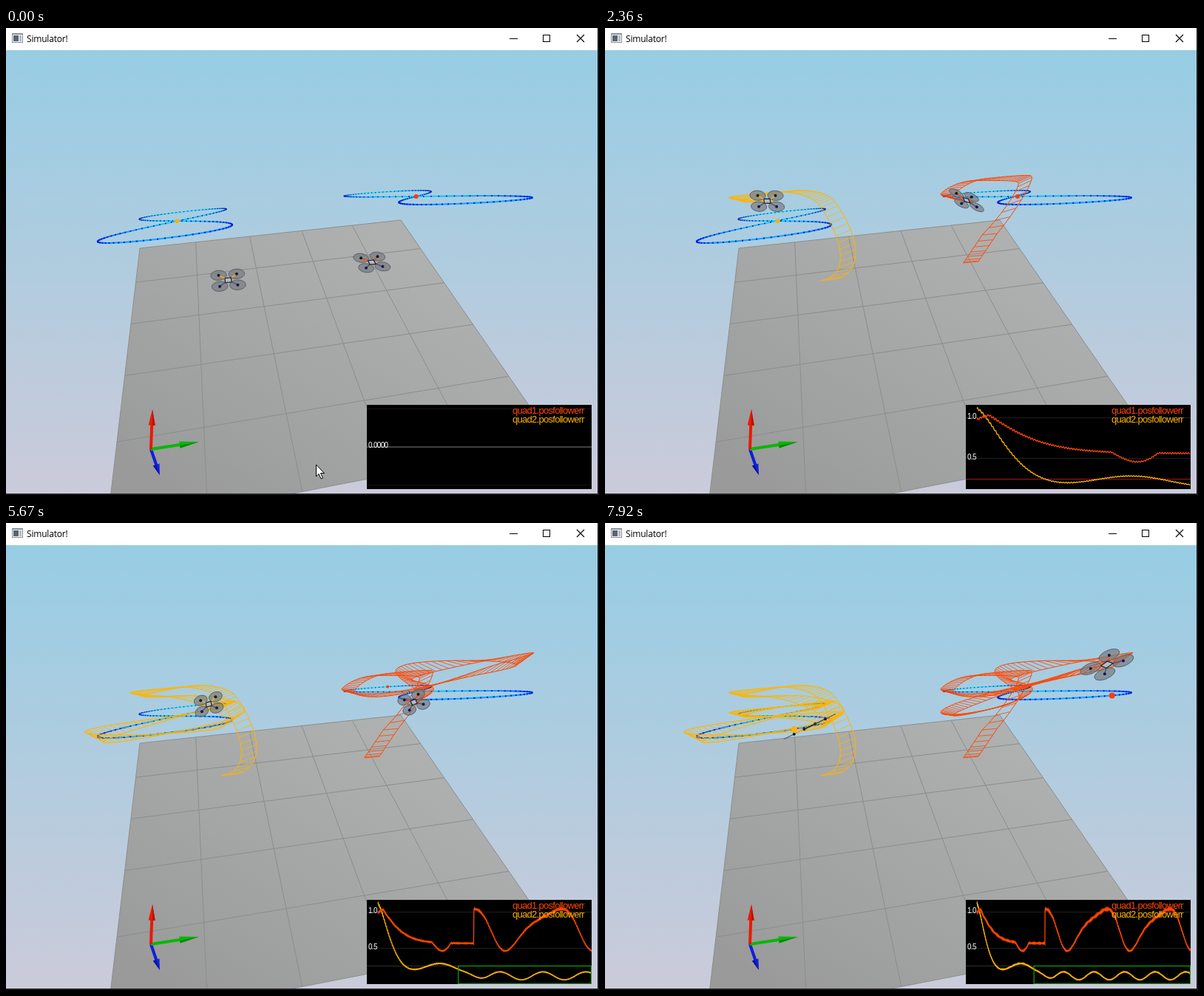
Write an HTML page with a canvas that moves like this. It is 802 by 632 pixels and loops after 8000 ms.

```html
<!DOCTYPE html>
<html lang="en">
<head>
<meta charset="utf-8">
<title>Simulator!</title>
<style>
  html, body { margin: 0; width: 100%; height: 100%; overflow: hidden; background: #fff; }
  canvas { display: block; }
</style>
</head>
<body>
<canvas id="stage" width="802" height="632"></canvas>
<script>
const LOOP = 8000, START = 150, LAP = 4590, TAU = 2 * Math.PI;
const RED = '#ff4600', YELLOW = '#ffb400';
const ctx = document.getElementById('stage').getContext('2d');

// The picture advances in even steps between these times (ms).
const ticks = [970, 1120, 1980, 2830, 3660, 4500, 5350, 6220, 7070, 7920];

// Smooth 0..1 ramp between two times.
function ease(from, to, t) {
  const f = Math.min(Math.max((t - from) / (to - from), 0), 1);
  return f * f * (3 - 2 * f);
}

// Perspective map of the unit square onto four corners.
function perspective([[x0, y0], [x1, y1], [x2, y2], [x3, y3]]) {
  const ax = x1 - x2, bx = x3 - x2, cx = x0 - x1 + x2 - x3;
  const ay = y1 - y2, by = y3 - y2, cy = y0 - y1 + y2 - y3;
  const det = ax * by - bx * ay, g = (cx * by - bx * cy) / det, h = (ax * cy - cx * ay) / det;
  return (s, t) => {
    const w = g * s + h * t + 1;
    return [((x1 - x0 + g * x1) * s + (x3 - x0 + h * x3) * t + x0) / w,
            ((y1 - y0 + g * y1) * s + (y3 - y0 + h * y3) * t + y0) / w];
  };
}

const lapAngle = t => Math.max(t - 60, 0) / LAP * TAU;
const sway = t => Math.cos((t - 3950) / LAP * TAU);

// Corners run near left, near right, far right, far left.
// Each drone chases its target with a lag, a take-off offset and a height error.
const drones = [
  {
    color: YELLOW, spot: '#ffb008', size: 12.2, back: [.8, 7.5], reach: 1.05, home: [69, 80],
    map: perspective([[126, 287], [306, 266], [298, 245], [181, 258]]),
    lag: () => 80,
    lift: t => 27 * (ease(500, 1300, t) - ease(2400, 3250, t)),
    error(s) {
      const climb = 1.01 * Math.exp(-((s / 420) ** 1.45));
      const bump = .18 * Math.exp(-(((s - 1600) / 620) ** 2));
      const ripple = .055 * Math.cos((s - 3150) / 1110 * TAU);
      return .11 + climb + bump + ease(2000, 3000, s) * (.01 + ripple);
    }
  },
  {
    color: RED, spot: '#ff3c10', size: 11.2, back: [3.5, 6.8], reach: .89, home: [-60, 89],
    map: perspective([[537, 238], [702, 228], [569, 220], [459, 228]]),
    lag: t => 400 + 130 * sway(t),
    lift: t => 17 * (ease(450, 900, t) - ease(1400, 2000, t)) + ease(1900, 3200, t) * (8 + 43 * sway(t)),
    error(s) {
      const peak = 2475, a = (s < peak ? peak - s : s - peak) / 2268 * TAU;
      const wave = .755 + .29 * Math.cos(a + .55 * (1 - Math.cos(a)));
      const climb = .57 + .55 * Math.exp(-((s / 520) ** 1.3));
      return s < peak ? Math.min(wave, climb) : wave;
    }
  }
];

for (const d of drones) {
  // Figure-eight: u runs away from the viewer, v to the right.
  d.target = (a, reach = 1) =>
    d.map((reach * Math.sin(2 * a) + 1) / 2, (Math.SQRT2 * Math.sin(a) + 1) / 2);

  d.state = t => {
    const a = lapAngle(t - d.lag(t)), u = Math.sin(a), v = Math.sin(2 * a), near = Math.max(-u, 0);
    const grounded = 1 - ease(START, 850, t), [tx, ty] = d.target(a, d.reach);
    const x = tx + d.home[0] * grounded, y = ty + d.home[1] * grounded - d.lift(t);
    const ax = d.size - 2.2 * u, ay = -1 - (6 - 3.5 * u) * v;
    const bx = d.back[0] + 10 * near * v, by = d.back[1] - 13 * near ** 3;
    return { t, x, y, ax, ay, bx, by,
      left: [x - .9 * ax, y - .9 * ay], right: [x + .9 * ax, y + .9 * ay] };
  };

  d.rungs = [];
  for (let t = START; t < LOOP; t += 45) d.rungs.push(d.state(t));
  d.plot = [];
  for (let s = 0; s <= LOOP - START; s += 7) {
    const e = d.error(s);
    d.plot.push([s, e + (.003 + .009 * e) * Math.sin(s / 27 * TAU)]);
  }
}

function line(c, points, color, width = 1) {
  c.beginPath();
  points.forEach(([x, y]) => c.lineTo(x, y));
  c.strokeStyle = color;
  c.lineWidth = width;
  c.stroke();
}

function fillShape(c, points, color) {
  c.beginPath();
  points.forEach(([x, y]) => c.lineTo(x, y));
  c.closePath();
  c.fillStyle = color;
  c.fill();
}

function fillRect(c, x, y, w, h, color) {
  c.fillStyle = color;
  c.fillRect(x, y, w, h);
}

function dot(c, [x, y], r, color) {
  c.beginPath();
  c.arc(x, y, r, 0, TAU);
  c.fillStyle = color;
  c.fill();
}

function text(c, str, x, y, font, color, spacing = 0) {
  c.font = font;
  c.letterSpacing = spacing + 'px';
  c.fillStyle = color;
  c.fillText(str, x, y);
}

function arrow(c, x, y, color, shade) {
  const ox = 196, oy = 570, dx = x - ox, dy = y - oy, len = Math.hypot(dx, dy);
  const at = (f, w) => [ox + dx * f - dy / len * w, oy + dy * f + dx / len * w];
  fillShape(c, [at(0, -2), at(.65, -2), at(.65, 2), at(0, 2)], color);
  fillShape(c, [at(.6, -4.5), at(1, 0), at(.6, 4.5)], color);
  fillShape(c, [at(.6, 1), at(1, 0), at(.6, 4.5)], shade);
}

function drawFloor(c) {
  const at = perspective([[136, 679], [742, 561], [534, 260], [181, 298]]);
  const shade = c.createLinearGradient(480, 260, 250, 640);
  shade.addColorStop(0, '#afb0b0');
  shade.addColorStop(.6, '#a2a4a4');
  shade.addColorStop(1, '#9a9a9a');
  fillShape(c, [at(0, 0), at(1, 0), at(1, 1), at(0, 1)], shade);
  for (let i = 0; i <= 5; i++) {
    line(c, [at(i / 5, 0), at(i / 5, 1)], '#8b8e8e');
    line(c, [at(0, i / 5), at(1, i / 5)], '#8b8e8e');
  }
}

function drawLoop(c, d) {
  const count = 130;
  for (let i = 0; i < count; i++) {
    const a = i / count * TAU, p = d.target(a), q = d.target(a + TAU / count);
    const near = .5 - Math.sin(a) / 2, fast = Math.abs(Math.cos(2 * a));
    const r = 1.2 + .8 * near;
    line(c, [p, q], `rgb(10,${70 + 165 * fast * (1 - .4 * near)},255)`, 1.3 + .8 * near);
    fillRect(c, p[0] - r / 2, p[1] - r / 2, r, r, `rgb(0,30,${150 + 70 * near})`);
  }
}

function drawScene(c) {
  const sky = c.createLinearGradient(0, 30, 0, 630);
  sky.addColorStop(0, '#97cde4');
  sky.addColorStop(1, '#cbcbda');
  fillRect(c, 0, 30, 802, 602, sky);
  drawFloor(c);
  arrow(c, 208, 605, '#1020d8', '#0a1494');
  arrow(c, 261, 560, '#08b808', '#068806');
  arrow(c, 198, 516, '#e81a04', '#b81200');
  drones.forEach(d => drawLoop(c, d));
}

function drawWindow(c) {
  fillRect(c, 0, 0, 802, 30, '#fff');
  fillRect(c, 8, 7, 15, 13, '#8a9199');
  fillRect(c, 9, 9, 13, 10, '#f4f6f8');
  fillRect(c, 10, 10, 7, 8, '#5a6470');
  fillRect(c, 18, 10, 3, 8, '#b4bcc4');
  text(c, 'Simulator!', 28, 19, '12px "Open Sans", "Noto Sans", sans-serif', '#000', -.2);
  line(c, [[681, 14.5], [692, 14.5]], '#000');
  c.strokeRect(726.5, 9.5, 9, 9);
  line(c, [[772, 9], [782, 19]], '#000', 1.1);
  line(c, [[782, 9], [772, 19]], '#000', 1.1);
  fillRect(c, 800, 0, 2, 632, '#202024');
  fillRect(c, 0, 630, 802, 2, '#202024');
}

function drawCursor(c) {
  const shape = [[419.5, 591], [419.5, 607], [423, 603.5], [426, 610], [428.5, 609], [425.5, 602.5], [430.5, 602.5]];
  fillShape(c, shape, '#fff');
  line(c, [...shape, shape[0]], '#000');
}

function drawTrail(d, now) {
  const rungs = d.rungs.filter(r => r.t <= now.t).concat(now);
  line(ctx, rungs.map(r => r.left), d.color);
  line(ctx, rungs.map(r => r.right), d.color);
  for (const r of rungs) line(ctx, [r.left, r.right], d.color, .8);
}

function drawDrone(d, s) {
  const at = (u, v) => [s.x + u * s.ax + v * s.bx, s.y + u * s.ay + v * s.by];
  const corners = [[-1, -1], [1, -1], [-1, 1], [1, 1]];
  for (const [u, v] of corners) {
    ctx.save();
    ctx.transform(s.ax, s.ay, s.bx, s.by, s.x, s.y);
    ctx.beginPath();
    ctx.arc(u, v, .88, 0, TAU);
    ctx.restore();
    ctx.fillStyle = 'rgba(118,122,128,.68)';
    ctx.fill();
    ctx.strokeStyle = '#5c5f64';
    ctx.lineWidth = 1;
    ctx.stroke();
  }
  for (const [u, v] of corners) {
    line(ctx, [[s.x, s.y], at(u, v)], v < 0 ? d.color : '#55565c', 1.4);
    dot(ctx, at(u, v), 2, v < 0 ? '#1a1a1c' : '#16165a');
  }
  const box = [at(-.35, -.4), at(.35, -.4), at(.35, .4), at(-.35, .4)];
  fillShape(ctx, box, '#b4bccc');
  line(ctx, [...box, box[0]], '#26262c', 1.3);
}

function drawCurves(t, hline, label) {
  const span = Math.max(t - START, 20), limitFrom = 2075, limitHeld = limitFrom + 3000;
  const curves = drones.map(d => d.plot.filter(p => p[0] <= span));
  const low = Math.min(...curves.flat().map(p => p[1]));
  const unit = 103.5 / Math.max(1.12 - low, .05);
  const px = s => 503 + 289 * s / span, py = v => 515 + (1.12 - v) * unit;
  for (const v of [1, .5]) {
    const y = Math.round(py(v)) - .5;
    if (y > 622) continue;
    hline(y, '#202020');
    label(v.toFixed(1), y + 1);
  }
  const limit = Math.round(py(.25)) - .5;
  hline(limit, span < limitFrom ? '#707070' : span < limitHeld ? '#a01c1c' : '#303030');
  curves.forEach((p, i) => line(ctx, p.map(([s, v]) => [px(s), py(v)]), drones[i].color, 1.3));
  if (span >= limitHeld) {
    ctx.strokeStyle = '#10a010';
    ctx.lineWidth = 1.2;
    ctx.strokeRect(px(limitFrom), limit, 791.5 - px(limitFrom), 623.5 - limit);
  }
}

function drawPlot(t) {
  const family = 'px "Liberation Sans", Arial, sans-serif';
  const hline = (y, color) => line(ctx, [[488, y], [792, y]], color);
  const label = (str, y) => text(ctx, str, 490, y, 10 + family, '#fff', -.7);
  ctx.save();
  ctx.beginPath();
  ctx.rect(488, 510, 304, 114);
  ctx.clip();
  fillRect(ctx, 488, 510, 304, 114, '#000');
  if (t < START) {
    hline(515.5, '#161616');
    hline(618.5, '#161616');
    hline(567, '#808080');
    label('0.0000', 568);
  } else {
    drawCurves(t, hline, label);
  }
  text(ctx, 'quad1.posfollowerr', 685, 522, 13 + family, RED, -.72);
  text(ctx, 'quad2.posfollowerr', 685, 533.5, 13 + family, YELLOW, -.72);
  ctx.restore();
}

function snap(t) {
  let from = START;
  if (t < from) return 0;
  for (const to of ticks) {
    if (t < to) {
      const step = from === 970 ? to - from : (to - from) / 11;
      return from + Math.floor((t - from) / step + .1) * step;
    }
    from = to;
  }
  return from;
}

const backdrop = document.createElement('canvas');
backdrop.width = 802;
backdrop.height = 632;
drawScene(backdrop.getContext('2d'));

function render(t) {
  const a = lapAngle(t);
  ctx.drawImage(backdrop, 0, 0);
  for (const d of drones) {
    const now = d.state(t);
    dot(ctx, d.target(a), 3 - Math.sin(a), d.spot);
    if (t >= START) drawTrail(d, now);
    drawDrone(d, now);
  }
  drawPlot(t);
  drawWindow(ctx);
  if (t < START) drawCursor(ctx);
}

const begin = performance.now();
function tick() {
  render(snap((performance.now() - begin) % LOOP));
  requestAnimationFrame(tick);
}
tick();
</script>
</body>
</html>
```
